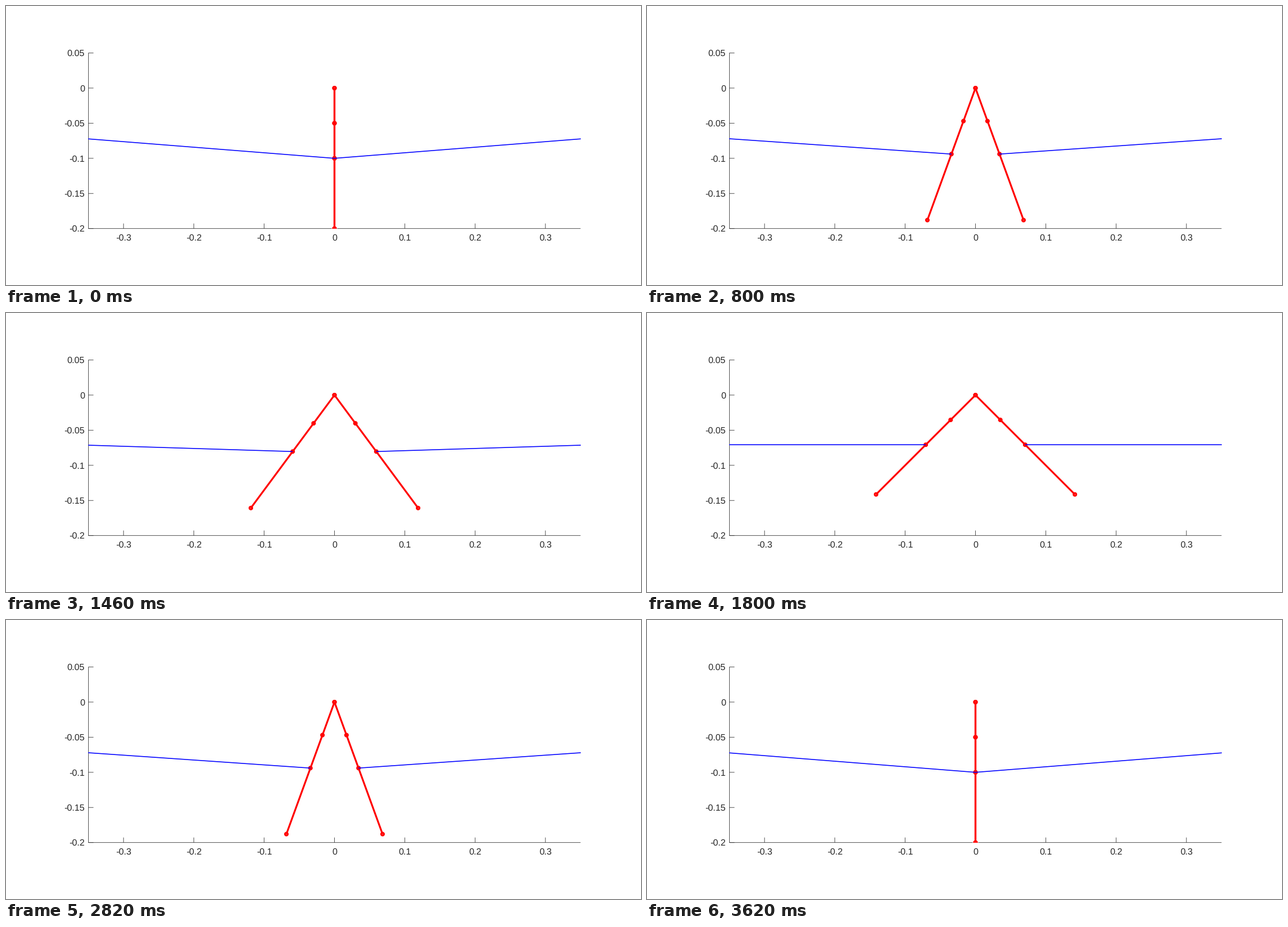
Animation, 1128 px wide and 496 px high, one loop 3.64 s. Source, as a matplotlib script:

```python
import numpy as np
import matplotlib.pyplot as plt
from matplotlib.animation import FuncAnimation

W, H, DPI = 1128, 496, 64
PX = 72 / DPI                       # points per pixel
FRAMES, STEP = 182, 20
XMIN, XMAX, YMIN, YMAX = -0.35, 0.35, -0.2, 0.05

LEG = np.array([0, 0.05, 0.1, 0.2])  # joint distances from the pivot
HINGE = 0.1
ROD = 0.3
INK = "#262626"

plt.rcParams["text.hinting"] = "none"
fig = plt.figure(figsize=(W / DPI, H / DPI), dpi=DPI, facecolor="white")

# Equal scale on both axes; the plot box in pixels from the bottom left.
box_w = 0.775 * W
scale = box_w / (XMAX - XMIN)
box_h = (YMAX - YMIN) * scale
box_x = 0.13 * W - 0.25
box_y = 0.5175 * H - box_h / 2 - 0.25

ax = fig.add_axes([box_x / W, box_y / H, box_w / W, box_h / H])
ax.set_xlim(XMIN, XMAX)
ax.set_ylim(YMIN, YMAX)
ax.axis("off")


def stroke(color, width, zorder, xs=(), ys=(), clip=True):
    line, = ax.plot(xs, ys, color=color, lw=width * PX, zorder=zorder,
                    solid_capstyle="butt", clip_on=clip, snap=False)
    return line


def axis_line(xs, ys):
    stroke(INK, 0.8, 2, xs, ys, clip=False)


def label(value, px, py, align):
    fig.text(px / W, 1 - py / H, f"{value:g}", ha=align, va="baseline",
             family="Liberation Sans", size=16 * PX, color=INK)


tick = 9 / scale
axis_line([XMIN, XMIN, XMAX], [YMAX, YMIN, YMIN])
for v in (i / 10 for i in range(-3, 4)):
    axis_line([v, v], [YMIN, YMIN + tick])
    label(v, box_x + (v - XMIN) * scale, 416.8, "center")
for v in (i / 20 for i in range(-4, 2)):
    axis_line([XMIN, XMIN + tick], [v, v])
    label(v, 139.8, H - box_y - (v - YMIN) * scale + 5.6, "right")


def make_side():
    gap = stroke("white", 2, 3, clip=False)
    leg = stroke("red", 3.2, 4)
    joints = [ax.add_patch(plt.Circle((0, 0), 2.4 / scale, fill=False,
                                      ec="red", lw=3.2 * PX, zorder=4))
              for _ in LEG]
    rod = stroke("blue", 1.6, 5)
    return gap, leg, joints, rod


sides = {-1: make_side(), 1: make_side()}
end_x = ROD + HINGE * np.sin(np.pi / 4)
end_y = -HINGE * np.cos(np.pi / 4)


def draw(i):
    angle = np.radians(0.5 * min(i, FRAMES - 1 - i))
    s, c = np.sin(angle), np.cos(angle)
    ys = -LEG * c
    touching = (ys[-1] - YMIN) * scale < 4
    for sign, (gap, leg, joints, rod) in sides.items():
        xs = sign * LEG * s
        leg.set_data(xs, ys)
        for joint, x, y in zip(joints, xs, ys):
            joint.center = x, y
        rod.set_data([sign * HINGE * s, sign * end_x], [-HINGE * c, end_y])
        # The axis line is hidden where a foot overlaps it.
        reach = 4.8 / scale
        gap.set_data([xs[-1] - reach, xs[-1] + reach], [YMIN, YMIN])
        gap.set_visible(touching)
    return []


anim = FuncAnimation(fig, draw, frames=FRAMES, interval=STEP, repeat=True,
                     repeat_delay=0, blit=False)
plt.show()
```
